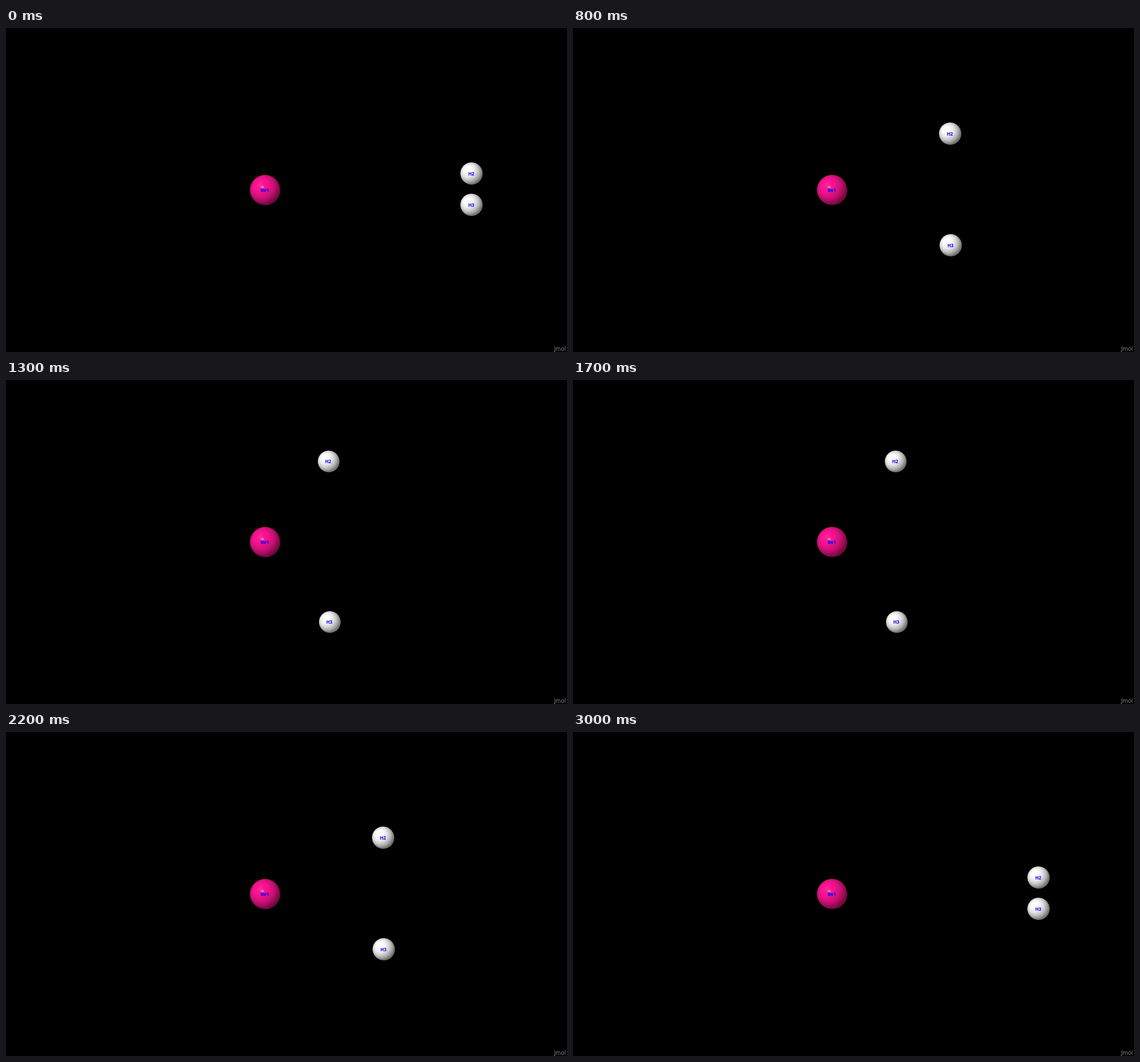
These frames come from a looping animation (984 by 569 pixels, 3100 ms). An HTML page with a canvas:

```html
<!DOCTYPE html>
<html lang="en">
<head>
<meta charset="utf-8">
<title>Be + H2</title>
<style>
  html, body { margin: 0; width: 100%; height: 100%; overflow: hidden; background: #000; }
  canvas, svg { position: absolute; left: 0; top: 0; width: 984px; height: 569px; }
  text { font-family: "Open Sans", "Noto Sans", sans-serif; }
  .label { font-size: 8px; font-weight: 700; fill: #00f; text-anchor: middle; }
  .mark { font-size: 10px; fill: #8c8c8c; text-anchor: end; }
</style>
</head>
<body>
<canvas id="stage" width="984" height="569"></canvas>
<svg viewBox="0 0 984 569">
  <text class="label" x="454" y="288">Be1</text>
  <text class="label" id="h2">H2</text>
  <text class="label" id="h3">H3</text>
  <text class="mark" x="982" y="567">Jmol</text>
</svg>
<script>
const FRAME = 100, COUNT = 31, HALF = 15;
const AMBIENT = 0.45, DIFFUSE = 0.84, SPECULAR = 0.22, NORMAL = 52 / 64;
const len = Math.hypot(1, 1, 2.5);
const light = [-1 / len, -1 / len, 2.5 / len];
const ctx = document.getElementById('stage').getContext('2d');

// Diffuse plus specular intensity for a unit normal, 0..1
function intensity(x, y, z) {
  const dot = x * light[0] + y * light[1] + z * light[2];
  if (dot <= 0) return 0;
  const shine = Math.max(0, 2 * dot * z - light[2] * 1);
  const glint = Math.max(0, Math.min(1, shine)) ** 64;
  return Math.min(1, dot * DIFFUSE + glint * SPECULAR);
}

function tint(c, i) {
  return i < NORMAL
    ? c * (AMBIENT + (1 - AMBIENT) * i / NORMAL)
    : c + (255 - c) * 0.5 * (i - NORMAL) / (1 - NORMAL);
}

// Shaded ball with a soft one-pixel rim
function ball(size, rgb) {
  const cv = document.createElement('canvas');
  cv.width = cv.height = size;
  const g = cv.getContext('2d');
  const img = g.createImageData(size, size);
  const r = size / 2;
  for (let py = 0, p = 0; py < size; py++) {
    for (let px = 0; px < size; px++, p += 4) {
      const x = (px + 0.5) / r - 1, y = (py + 0.5) / r - 1;
      const d = Math.hypot(x, y), s = Math.max(1, d);
      const z = Math.sqrt(Math.max(0, 1 - d * d));
      const i = intensity(x / s, y / s, z);
      rgb.forEach((c, k) => { img.data[p + k] = tint(c, i); });
      img.data[p + 3] = 255 * Math.max(0, Math.min(1, r - d * r + 0.5));
    }
  }
  g.putImageData(img, 0, 0);
  return cv;
}

const white = [255, 255, 255];
const beryllium = ball(53, [255, 20, 147]);
const near = ball(39, white), far = ball(38, white);

// Each coordinate is start + speed * n + bend * n^2
const atoms = [
  { el: document.getElementById('h2'), x: [816, -19.42, 0.013], y: [255.2, -8.75, 0.005] },
  { el: document.getElementById('h3'), x: [816.1, -19.23, 0.011], y: [310.75, 8.85, -0.008] }
];
const at = ([a, b, c], n) => Math.floor(a + b * n + c * n * n);

let shown = -1;
function draw(now) {
  const step = Math.floor(now / FRAME) % COUNT;
  const n = HALF - Math.abs(HALF - step);
  if (n !== shown) {
    shown = n;
    ctx.clearRect(0, 0, 984, 569);
    ctx.drawImage(beryllium, 428, 258);
    const sprite = n > 10 ? far : near;
    for (const { el, x, y } of atoms) {
      const cx = at(x, n), cy = at(y, n);
      const off = n > 10 ? 18 : 19;
      ctx.drawImage(sprite, cx - off, cy - off);
      el.setAttribute('x', cx);
      el.setAttribute('y', cy + 4);
    }
  }
  requestAnimationFrame(() => draw(performance.now()));
}
draw(performance.now());
</script>
</body>
</html>
```
